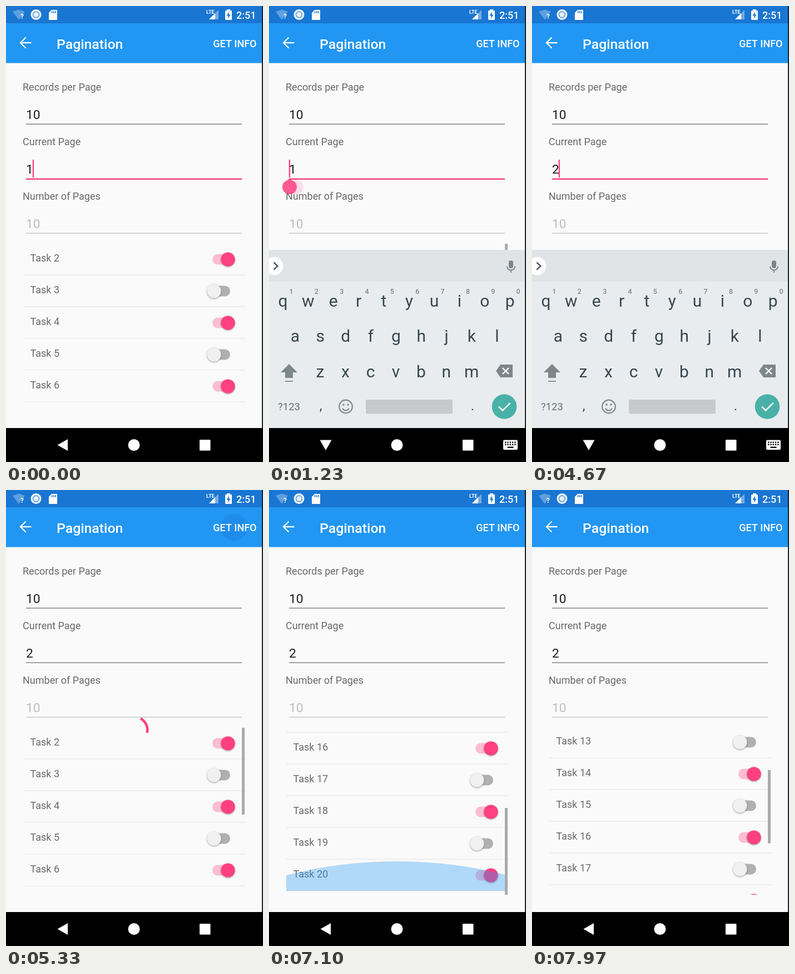
Animation of 462 by 819 pixels, one loop 8000 ms. Source, as an HTML page with a canvas:

```html
<!DOCTYPE html>
<html lang="en">
<head>
<meta charset="utf-8">
<title>Pagination</title>
<style>
  html, body { margin: 0; width: 100%; height: 100%; overflow: hidden; background: #000; }
  canvas { display: block; width: 462px; height: 819px; }
</style>
</head>
<body>
<canvas id="stage"></canvas>
<script>
const W = 462, H = 819, LOOP = 8000, NAV = 758;
const PINK = '#ff4081', PAPER = '#fafafa', INK = '#1c1c1c', LABEL = '#696969';
const KEY = '#7d878b', KEY_INK = '#37474f', BAR = '#2196f3', STATUS = '#1976d2';
const LIST = { x: 31, top: 427, bottom: 727, row: 57, max: 276 };
const canvas = document.getElementById('stage');
const c = canvas.getContext('2d');
const dpr = window.devicePixelRatio || 1;
canvas.width = W * dpr;
canvas.height = H * dpr;

const clamp = v => Math.max(0, Math.min(1, v));
const smooth = u => u * u * (3 - 2 * u);
const ramp = (t, a, b) => clamp((t - a) / (b - a));

// Eased value through [time, value] points
function track(t, points) {
  if (t <= points[0][0]) return points[0][1];
  for (let i = 1; i < points.length; i++) {
    const [a, va] = points[i - 1], [b, vb] = points[i];
    if (t < b) return va + (vb - va) * smooth((t - a) / (b - a));
  }
  return points[points.length - 1][1];
}

function rect(x, y, w, h, fill) {
  c.fillStyle = fill;
  c.fillRect(x, y, w, h);
}

function disc(x, y, r, fill) {
  c.fillStyle = fill;
  c.beginPath();
  c.arc(x, y, r, 0, 7);
  c.fill();
}

function pill(x, y, w, h, r, fill) {
  c.fillStyle = fill;
  c.beginPath();
  c.roundRect(x, y, w, h, r);
  c.fill();
}

function path(points, closed) {
  c.beginPath();
  points.forEach(([x, y]) => c.lineTo(x, y));
  if (closed) c.closePath();
}

function poly(points, fill) {
  path(points, true);
  c.fillStyle = fill;
  c.fill();
}

function line(points, stroke, width) {
  path(points);
  c.strokeStyle = stroke;
  c.lineWidth = width;
  c.stroke();
}

function text(s, x, y, size, fill, weight = 400, align = 'left') {
  c.font = `${weight} ${size}px Roboto, sans-serif`;
  c.textAlign = align;
  c.fillStyle = fill;
  c.fillText(s, x, y);
}

function faded(alpha, draw) {
  if (alpha <= 0) return;
  c.save();
  c.globalAlpha *= alpha;
  draw();
  c.restore();
}

function drawStatusBar() {
  rect(0, 0, W, 31, STATUS);
  poly([[12, 10], [23, 6.5], [34, 10], [23, 25]], 'rgba(255,255,255,.3)');
  text('?', 26, 23, 12, '#fff', 700);
  disc(54, 15.5, 9.5, '#f4f6f8');
  disc(54, 15.5, 6.3, '#5b9fe0');
  disc(54, 15.5, 4.6, '#e6eff8');
  poly([[82, 7], [92, 7], [92, 25], [77, 25], [77, 12]], '#fff');
  [82, 85, 88].forEach(x => rect(x, 9, 1.5, 4, STATUS));
  poly([[382, 7], [382, 24], [365, 24]], 'rgba(255,255,255,.4)');
  poly([[376, 13], [376, 24], [365, 24]], '#fff');
  text('LTE', 360, 14, 9, '#fff', 700);
  rect(397, 6, 6, 3, '#fff');
  pill(394, 8, 12, 17, 1.5, '#fff');
  poly([[401, 10], [396.5, 17.5], [399.5, 17.5], [399, 23], [403.5, 15.5], [400.5, 15.5]], STATUS);
  text('2:51', 449.5, 22.5, 18, '#fff', 500, 'right');
}

function drawAppBar(t) {
  rect(0, 31, W, 71.5, BAR);
  line([[45.5, 66], [27, 66]], '#fff', 2.3);
  line([[35.5, 56.5], [26, 66], [35.5, 75.5]], '#fff', 2.3);
  text('Pagination', 91, 76.5, 24.8, '#fff', 500);
  const grow = 8 + 16 * smooth(ramp(t, 4870, 5230));
  const shown = t < 4870 ? 0 : 1 - ramp(t, 5250, 5650);
  faded(shown, () => disc(410, 67, grow, 'rgba(25,118,210,.4)'));
  text('GET INFO', 450.5, 74, 18, '#fff', 500, 'right');
}

function cursorState(t) {
  const edits = [0, 1170, 2070, 3370, 4330];
  const last = edits.filter(e => e <= t).pop();
  const atStart = (t >= 1170 && t < 2070) || (t >= 3370 && t < 4330);
  return { x: atStart ? 37 : 49, on: (t - last) % 1000 < 500 };
}

function drawFields(t) {
  const focused = t < 4900;
  text('Records per Page', 30, 152, 18, LABEL);
  text('Current Page', 30, 250, 18, LABEL);
  text('Number of Pages', 30, 348, 18, LABEL);
  text('10', 36, 203, 22.8, INK);
  text(t < 3370 ? '1' : t < 4330 ? '' : '2', 36, 301, 22.8, INK);
  text('10', 36, 399, 22.8, '#bdbdbd');
  rect(36, 211.5, 388, 1.3, '#757575');
  if (focused) rect(36, 309.5, 388, 2.5, PINK);
  else rect(36, 309.5, 388, 1.3, '#757575');
  rect(36, 407.5, 388, 1.2, '#bcbcb8');
  const cur = cursorState(t);
  if (focused && cur.on) rect(cur.x - 1.2, 276, 2.3, 32, PINK);
}

function drawHandle(t) {
  const ghost = t < 1170 ? 0 : 0.2 * (1 - ramp(t, 1170, 1400));
  const { x } = cursorState(t);
  faded(ghost, () => disc(49, 325, 13, PINK));
  if (t < 500 || t >= 3370) return;
  faded(1 - ghost, () => {
    c.beginPath();
    c.arc(x, 325, 13, -Math.PI * 0.25, Math.PI * 1.25);
    c.lineTo(x, 310.5);
    c.fillStyle = PINK;
    c.fill();
  });
}

function drawSwitch(y, on) {
  pill(371, y - 9.5, 32, 19, 9.5, on ? '#fbbdd2' : '#b0b0b0');
  c.save();
  c.shadowColor = 'rgba(0,0,0,.4)';
  c.shadowBlur = 3 * dpr;
  c.shadowOffsetY = dpr;
  disc(on ? 399 : 374, y, 12.6, on ? PINK : '#f0f0f0');
  c.restore();
}

const scrollAt = t => track(t, [[6050, 0], [6670, 190], [6830, 190], [7010, LIST.max],
  [7420, LIST.max], [7970, 116]]);

function drawGlow(t) {
  const rise = smooth(ramp(t, 6960, 7100)) * (1 - smooth(ramp(t, 7150, 7480)));
  if (rise <= 0) return;
  const depth = 53 * rise, radius = 804;
  c.save();
  c.beginPath();
  c.rect(LIST.x, 640, 398, 80);
  c.clip();
  disc(230, 720 - depth + radius, radius, 'rgba(33,150,243,.34)');
  c.restore();
}

function drawList(t) {
  const first = t < 5700 ? 2 : 11;
  const scroll = scrollAt(t);
  c.save();
  c.beginPath();
  c.rect(LIST.x, LIST.top, 401, LIST.bottom - LIST.top);
  c.clip();
  for (let i = 0; i < 10; i++) {
    const y = LIST.top - 1 + i * LIST.row - scroll, n = first + i;
    text('Task ' + n, 43.5, y + 33, 18, LABEL);
    drawSwitch(y + 29, n % 2 === 0);
    rect(LIST.x, y + 56.5, 400, 1, '#e6e6e6');
  }
  c.restore();
  drawGlow(t);
}

function drawScrollbar(t) {
  const small = ramp(t, 700, 720) * (1 - ramp(t, 1260, 1480));
  const full = ramp(t, 5030, 5060) * (1 - ramp(t, 5750, 5950)) + ramp(t, 6050, 6080);
  faded(small, () => rect(424, LIST.top, 5, 12, '#aaa'));
  const p = scrollAt(t) / LIST.max;
  const h = 156 - 25 * Math.sin(Math.PI * p);
  const y = LIST.top + (300 - h) * Math.pow(p, 0.92);
  faded(full, () => rect(424, y, 5, h, '#aaa'));
}

function drawSpinner(t) {
  if (t < 5030 || t >= 5700) return;
  const u = (t - 5030) / 1333, rad = Math.PI / 180;
  const tail = -90 + 124 * u, span = 270 * Math.pow(2 * u, 1.62);
  c.beginPath();
  c.arc(231, 431, 23.2, tail * rad, (tail + span) * rad);
  c.strokeStyle = PINK;
  c.lineWidth = 4.5;
  c.stroke();
}

function drawIcons() {
  disc(9, 467, 16.3, '#fff');
  line([[8.5, 460.5], [15.5, 467], [8.5, 473.5]], '#4b585e', 2.4);

  pill(431, 457, 8, 14, 4, KEY);
  c.beginPath();
  c.arc(435, 467.5, 7, 0, Math.PI);
  c.strokeStyle = KEY;
  c.lineWidth = 2;
  c.stroke();
  rect(434, 474, 2, 5, KEY);

  poly([[36, 643], [51, 658], [43, 658], [43, 668], [29, 668], [29, 658], [21, 658]], KEY);
  rect(29, 673, 14, 1.8, KEY);

  poly([[416, 644], [438, 644], [438, 667], [416, 667], [408, 655.5]], KEY);
  line([[420, 650], [431, 661]], '#fff', 2.4);
  line([[431, 650], [420, 661]], '#fff', 2.4);

  c.strokeStyle = KEY;
  c.lineWidth = 2.2;
  c.beginPath();
  c.arc(138, 719.5, 11.8, 0, 7);
  c.stroke();
  c.beginPath();
  c.arc(138, 720.5, 6, 0.35, Math.PI - 0.35);
  c.stroke();
  disc(134, 716, 1.8, KEY);
  disc(142, 716, 1.8, KEY);

  disc(423, 719.5, 22.3, '#48b1a8');
  line([[413, 719.5], [420, 726.5], [433.5, 713]], '#fff', 2.6);
}

function drawKeyboard(t) {
  const open = smooth(ramp(t, 400, 680)) * (1 - smooth(ramp(t, 4900, 5060)));
  if (open <= 0) return;
  c.save();
  c.beginPath();
  c.rect(0, 0, W, NAV);
  c.clip();
  c.translate(0, (1 - open) * 320);
  rect(0, 438, W, 320, '#e9ecee');
  rect(0, 438, W, 57, '#e1e4e6');
  [['qwertyuiop', 25, 540], ['asdfghjkl', 47, 603], ['zxcvbnm', 92, 667]].forEach(([keys, x, y]) =>
    [...keys].forEach((k, i) => text(k, x + i * 45.35, y, 30, KEY_INK, 400, 'center')));
  [...'1234567890'].forEach((d, i) => text(d, 40 + i * 45.35, 516.5, 12.5, KEY, 500, 'center'));
  text('?123', 36, 726, 18.5, '#647177', 400, 'center');
  text(',', 93, 726, 24, KEY_INK, 400, 'center');
  text('.', 366, 726, 24, KEY_INK, 400, 'center');
  pill(174, 707, 156, 25.5, 3, '#c6cacc');
  drawIcons();
  c.restore();
}

function drawNavBar(t) {
  rect(0, NAV, W, H - NAV, '#000');
  const turn = smooth(ramp(t, 400, 560)) * (1 - smooth(ramp(t, 4900, 5040)));
  c.save();
  c.translate(102, 788.5);
  c.rotate(-turn * Math.PI / 2);
  poly([[-9.5, 0], [9, -10.5], [9, 10.5]], '#fff');
  c.restore();
  disc(230, 788.5, 10.5, '#fff');
  pill(348, 779, 19.5, 19.5, 1, '#fff');
  if (t < 400 || t >= 4900) return;
  pill(421, 779.5, 26, 17.5, 2, '#fff');
  for (let i = 0; i < 10; i++) rect(424 + (i % 5) * 4.3, 782.5 + (i > 4 ? 4 : 0), 2.4, 2.3, '#000');
  rect(428.5, 791.5, 11, 2.3, '#000');
}

function draw(t) {
  c.setTransform(dpr, 0, 0, dpr, 0, 0);
  rect(0, 0, W, H, PAPER);
  drawStatusBar();
  drawAppBar(t);
  drawFields(t);
  drawList(t);
  drawScrollbar(t);
  drawSpinner(t);
  drawHandle(t);
  drawKeyboard(t);
  rect(460, 0, 2, NAV, '#16242c');
  drawNavBar(t);
}

const start = performance.now();
function frame() {
  draw((performance.now() - start) % LOOP);
  requestAnimationFrame(frame);
}
frame();
</script>
</body>
</html>
```
